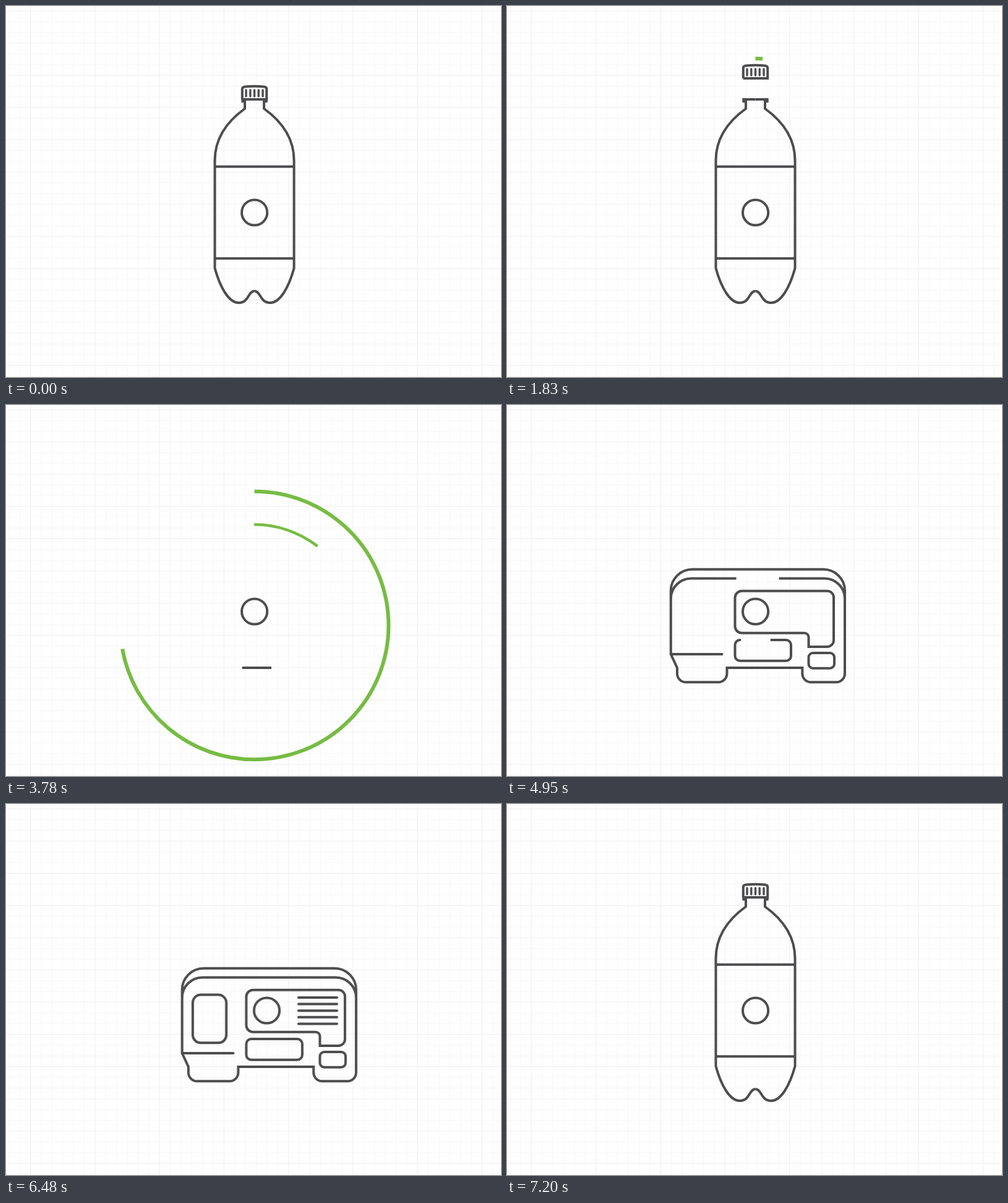
Recreate the animation shown at these times as an HTML page without scripts. Size 800x600 px, loop 7230 ms.

```html
<!DOCTYPE html>
<html lang="en">
<head>
<meta charset="utf-8">
<title>Bottle to radio</title>
<style>
@property --s { syntax: "<number>"; inherits: false; initial-value: 0; }
@property --e { syntax: "<number>"; inherits: false; initial-value: 0; }

:root {
  --loop: 7.23s;
  --ink: #4d4d4f;
  --green: #76bc43;
  --smooth: cubic-bezier(.3333, 0, .6667, 1);
}
html, body { margin: 0; width: 100%; height: 100%; overflow: hidden; background: #fefefe; }
svg { display: block; width: 800px; height: 600px; }

.ink { fill: none; stroke: var(--ink); stroke-width: 4; }
.round { stroke-linecap: round; }

/* --t is the start time in ms within the loop */
.draw, .ring, .dot { animation-delay: calc((var(--t) - 7230) * 1ms); }

.bottle { animation: bottle var(--loop) infinite; }
.radio { animation: radio var(--loop) infinite; }
.cap { animation: cap var(--loop) infinite; }
.wipe {
  stroke-dasharray: 1 2;
  animation: wipe var(--loop) infinite;
}
.draw {
  stroke-dasharray: 1 2;
  animation-name: draw;
  animation-duration: var(--loop);
  animation-iteration-count: infinite;
}
.ring {
  fill: none;
  stroke: var(--green);
  stroke-dasharray: 0px calc(var(--s) * 1px) calc((var(--e) - var(--s)) * 1px) 720px;
  animation-name: head, tail;
  animation-duration: var(--loop);
  animation-iteration-count: infinite;
}
.dot {
  fill: var(--green);
  animation-name: burst;
  animation-duration: var(--loop);
  animation-iteration-count: infinite;
  animation-timing-function: linear;
}

@keyframes bottle {
  0%, 41.49% { transform: translateX(0); }
  41.5%, 94.18% { transform: translateX(-800px); }
  94.19% { transform: translateX(-281px); animation-timing-function: cubic-bezier(.3333, 1, .6667, 1); }
  99.585%, 100% { transform: translateX(0); }
}
@keyframes radio {
  0%, 41.49% { transform: translateX(600px); }
  41.5% { transform: translateX(0); }
  87.14% { transform: translateX(0); animation-timing-function: cubic-bezier(.3333, 0, .6667, 0); }
  94.88% { transform: translateX(586px); }
  100% { transform: translateX(600px); }
}
@keyframes cap {
  0% { transform: translateY(0); }
  13.28% { transform: translateY(0); animation-timing-function: var(--smooth); }
  24.07%, 60% { transform: translateY(-34px); }
  60.01%, 100% { transform: translateY(0); }
}
@keyframes wipe {
  0% { stroke-dashoffset: 0; }
  25.59% { stroke-dashoffset: 0; animation-timing-function: var(--smooth); }
  33.61%, 60% { stroke-dashoffset: 1.01; }
  60.01%, 100% { stroke-dashoffset: 0; }
}
@keyframes draw {
  0% { stroke-dashoffset: 1.01; animation-timing-function: var(--smooth); }
  7.47%, 47% { stroke-dashoffset: 0; }
  47.01%, 100% { stroke-dashoffset: 1.01; }
}
@keyframes head {
  0% { --e: 0; animation-timing-function: var(--smooth); }
  8.575%, 100% { --e: 360; }
}
@keyframes tail {
  0% { --s: 0; }
  4.564% { --s: 0; animation-timing-function: var(--smooth); }
  10.373%, 100% { --s: 360; }
}
@keyframes burst {
  0% { opacity: 1; transform: rotate(var(--a)) translateY(-20px); }
  14.38% { opacity: 1; transform: rotate(var(--a)) translateY(-69px); }
  14.39%, 100% { opacity: 0; transform: rotate(var(--a)) translateY(-69px); }
}
</style>
</head>
<body>
<svg viewBox="0 0 800 600" xmlns="http://www.w3.org/2000/svg">
  <defs>
    <pattern id="minor" x="4.4" y="7.4" width="17.37" height="17.37" patternUnits="userSpaceOnUse">
      <path d="M.5 0V18M0 .5H18" stroke="#f7f7f7" fill="none"/>
    </pattern>
    <pattern id="major" x="39.2" y="7.4" width="104.22" height="52.11" patternUnits="userSpaceOnUse">
      <path d="M.5 0V53M0 .5H105" stroke="#f2f2f2" fill="none"/>
    </pattern>
    <circle id="disc" class="ink" cx="401.6" cy="334" r="20.6"/>
    <g id="dots">
      <circle class="dot" r="2.2" style="--a:0deg"/>
      <circle class="dot" r="2.2" style="--a:45deg"/>
      <circle class="dot" r="2.2" style="--a:90deg"/>
      <circle class="dot" r="2.2" style="--a:135deg"/>
      <circle class="dot" r="2.2" style="--a:180deg"/>
      <circle class="dot" r="2.2" style="--a:225deg"/>
      <circle class="dot" r="2.2" style="--a:270deg"/>
      <circle class="dot" r="2.2" style="--a:315deg"/>
    </g>
  </defs>

  <rect width="800" height="600" fill="url(#minor)"/>
  <rect width="800" height="600" fill="url(#major)"/>

  <g class="bottle ink">
    <path class="wipe" pathLength="1" d="M401.5 151H382.3V154.3H386V166C354 189 337.5 216 337.5 250V424C346 455 360 480 376 480C393 480 391 461 401.5 461"/>
    <path class="wipe" pathLength="1" d="M401.5 151H420.7V154.3H417V166C449 189 465.5 216 465.5 250V424C457 455 443 480 427 480C410 480 412 461 401.5 461"/>
    <path class="wipe" pathLength="1" d="M337.5 259.7H465.5"/>
    <path class="wipe" pathLength="1" d="M337.5 408.3H465.5"/>
    <g class="cap">
      <path class="wipe" pathLength="1" d="M381.8 151V134Q382 131.2 386 130.6Q401.5 128.8 417 130.6Q421 131.2 421.2 134V151Z"/>
      <g class="round" stroke-width="3.4">
        <path class="wipe" pathLength="1" d="M388 136V146"/>
        <path class="wipe" pathLength="1" d="M394.8 136V146"/>
        <path class="wipe" pathLength="1" d="M401.5 136V146"/>
        <path class="wipe" pathLength="1" d="M408.2 136V146"/>
        <path class="wipe" pathLength="1" d="M415 136V146"/>
      </g>
    </g>
    <use href="#disc"/>
  </g>

  <g class="radio ink">
    <!-- body, both halves from the bottom centre -->
    <path class="draw" style="--t:3740" pathLength="1" d="M405 425H355.5V434A14 14 0 0 1 341.5 448.3H289A14 14 0 0 1 275 434V425L264.8 403V300A35 34.3 0 0 1 299.8 265.8H405"/>
    <path class="draw" style="--t:3740" pathLength="1" d="M405 425H477.3V434A14 14 0 0 0 491.3 448.3H532A14 14 0 0 0 546 434V300A35 34.3 0 0 0 511 265.8H405"/>
    <path class="draw" style="--t:4690" pathLength="1" d="M264.8 313A33 32.5 0 0 1 298 280.5H405"/>
    <path class="draw" style="--t:4690" pathLength="1" d="M546 313A33 32.5 0 0 0 512.8 280.5H405"/>
    <path class="draw round" style="--t:4280" pathLength="1" d="M264.8 403H347.5"/>
    <!-- panel and boxes -->
    <path class="draw" style="--t:4220" pathLength="1" d="M379.5 300.8H517.5A10.5 10.5 0 0 1 528 311.3V380.5A10.5 10.5 0 0 1 517.5 391H487.5V375.5A7 7 0 0 0 480.5 368.7H379.5A11 11 0 0 1 368.5 357.7V311.8A11 11 0 0 1 379.5 300.8Z"/>
    <rect class="draw" style="--t:4350" pathLength="1" x="487.5" y="401" width="41.5" height="24.7" rx="7"/>
    <path class="draw round" style="--t:4690" pathLength="1" d="M376.5 380A8 8 0 0 0 368.5 388V405.8A8 8 0 0 0 376.5 413.8H451A8 8 0 0 0 459 405.8V388A8 8 0 0 0 451 380Z"/>
    <rect class="draw" style="--t:5030" pathLength="1" x="282" y="308.5" width="54.3" height="77.8" rx="13"/>
    <!-- speaker -->
    <g class="round">
      <path class="draw" style="--t:5080" pathLength="1" d="M453 313H515"/>
      <path class="draw" style="--t:5130" pathLength="1" d="M453 323.6H515"/>
      <path class="draw" style="--t:5180" pathLength="1" d="M453 334.2H515"/>
      <path class="draw" style="--t:5230" pathLength="1" d="M453 344.8H515"/>
      <path class="draw" style="--t:5280" pathLength="1" d="M453 355.4H515"/>
    </g>
    <use href="#disc"/>
  </g>

  <circle class="ring" style="--t:1820" pathLength="360" stroke-width="6" r="216.8" transform="translate(401.5 301.8) rotate(-90)"/>
  <circle class="ring" style="--t:2020" pathLength="360" stroke-width="4.6" r="167.3" transform="translate(401 306) rotate(-90)"/>
  <circle class="ring" style="--t:3515" pathLength="360" stroke-width="6" r="216.8" transform="translate(401.5 356.5) rotate(-90)"/>
  <circle class="ring" style="--t:3715" pathLength="360" stroke-width="4.6" r="167.3" transform="translate(401 360.6) rotate(-90)"/>

  <use href="#dots" style="--t:2110" transform="translate(402 106)"/>
  <use href="#dots" style="--t:4780" transform="translate(404.2 343)"/>
</svg>
</body>
</html>
```
